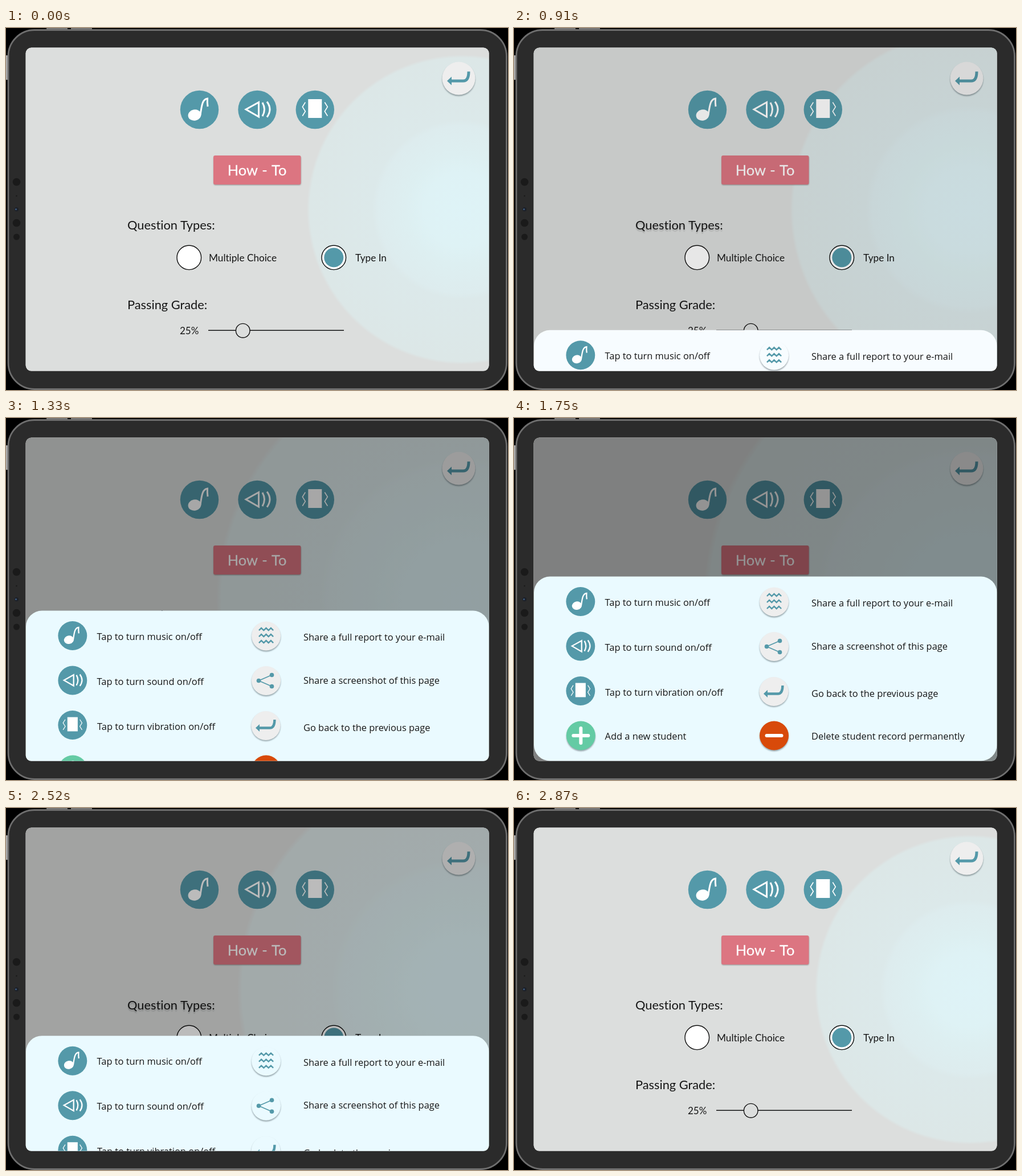
An HTML page that plays this animation: 881 by 636 pixels, repeating every 2.94 s.

```html
<!DOCTYPE html>
<html lang="en">
<head>
<meta charset="utf-8">
<title>Tablet settings sheet</title>
<style>
  html, body { margin: 0; width: 100%; height: 100%; overflow: hidden; background: #000; }
  svg { display: block; width: 881px; height: 636px; --sheet: #eafaff; --disc: #eee; }
  text { font-family: Lato, "Noto Sans", sans-serif; font-variant-ligatures: none; fill: #161616; }
  .list text { font: 16.42px "Open Sans", sans-serif; }
  .line { fill: none; stroke: #fff; stroke-width: 3; }
  .teal { fill: none; stroke: #5499a9; }
</style>
</head>
<body>
<svg id="stage" viewBox="0 0 881 636"></svg>
<script>
const LOOP = 2940, STEP = 70, TRAVEL = 324.5, TEAL = '#5499a9';
const stage = document.getElementById('stage');

const at = (x, y, body, scale = 1) => `<g transform="translate(${x} ${y}) scale(${scale})">${body}</g>`;
const dot = (x, y, r, fill, extra = '') => `<circle cx="${x}" cy="${y}" r="${r}" fill="${fill}" ${extra}/>`;
const label = (x, y, text, size, extra = '') =>
  `<text x="${x}" y="${y}" ${size ? `font-size="${size}"` : ''} ${extra}>${text}</text>`;
const path = (d, cls, extra = '') => `<path d="${d}" class="${cls}" ${extra}/>`;

// Raised round button: soft shadow below a flat disc
const raised = (r, fill, body) =>
  dot(0, 2, r, '#203038', 'opacity=".42" filter="url(#soft)"') + dot(0, 0, r, fill) + body;

const music = dot(0, 0, 33.7, TEAL) +
  '<ellipse cx="-8.5" cy="9.5" rx="11.5" ry="9.6" fill="#fff" transform="rotate(-12 -8.5 9.5)"/>' +
  path('M1.5 9C4 -7 5 -18.5 14 -19.5Q13.5 -12 14.5 -5.5', 'line');

const sound = dot(0, 0, 33.7, TEAL) +
  path('M-20 -.5L2.5 -13V12.5Z', 'line') +
  path('M9 -12.5Q16 -.5 9 11.5M17 -14Q27 -.5 17 13', 'line');

const vibrate = dot(0, 0, 33.7, TEAL) +
  '<rect x="-12" y="-18.5" width="24" height="33" fill="#fff"/>' +
  path('M-17 -13L-22 -5L-17 3L-22 11M17 -13L22 -5L17 3L22 11', 'line', 'style="stroke-width:1.6"');

const arrow = path('M-14 4.5H8Q17.5 4.5 17.5 -12', 'teal', 'stroke-width="5"') +
  `<path d="M-20.5 4.5L-12.5 -3V12Z" fill="${TEAL}"/>`;

const zigzag = [-10, 1, 12].map(y => `M-12.6 ${y}l4.2 -4 4.2 4 4.2 -4 4.2 4 4.2 -4 4.2 4`).join('');
const waves = path(zigzag, 'teal', 'stroke-width="2.4"');

const share = path('M10 -10L-13 0L10 10', 'teal', 'stroke-width="1.7"') +
  [[10, -10], [-13, 0], [10, 10]].map(([x, y]) => dot(x, y, 3.8, TEAL)).join('');

const bar = path('M-13 0H13', 'line', 'style="stroke-width:6;stroke-linecap:round"');
const plus = bar + `<g transform="rotate(90)">${bar}</g>`;

const disc = 'var(--disc)';
const device = `
  <rect x="71" y="0" width="37" height="5" fill="#777"/>
  <rect x="114" y="0" width="37" height="5" fill="#777"/>
  <rect x="0" y="48" width="3" height="43" fill="#aaa"/>
  <rect x="4" y="3.5" width="874.5" height="631" rx="46" fill="#2b2b2b" stroke="#6e6e6e" stroke-width="2.8"/>
  ${dot(18.5, 270.5, 6.8, '#1a1a1a')}${dot(18.5, 295, 1.2, '#1a1a1a')}
  ${dot(18.5, 318.5, 3.6, '#1c2029')}${dot(17.5, 318.5, 1.6, '#3d5a7c')}
  ${dot(18.5, 342.5, 6.8, '#1a1a1a')}${dot(18.5, 367, 5.5, '#1a1a1a')}`;

const settings = `
  <rect x="34" y="34" width="815" height="570" fill="#dcdedd"/>
  <rect x="34" y="34" width="815" height="570" fill="url(#glow)"/>
  ${at(794.5, 88.5, raised(29, '#eee', arrow))}
  ${at(339.5, 143.5, music)}${at(441, 143.5, sound)}${at(542.3, 143.5, vibrate)}
  <rect x="364.5" y="225.5" width="153" height="50.5" rx="3" fill="#333" opacity=".45" filter="url(#soft)"/>
  <rect x="364" y="224" width="153.5" height="51" rx="3" fill="#dc7581"/>
  ${label(440.5, 259, 'How - To', 25.4, 'text-anchor="middle" word-spacing="1.5" style="fill:#fff;stroke:#fff;stroke-width:.3"')}
  ${label(213, 354, 'Question Types:', 21.8, 'id="heading"')}
  ${dot(321.3, 403.3, 21.3, '#fff', 'stroke="#111" stroke-width="1.4"')}
  ${label(356, 409.5, 'Multiple Choice', 17.2)}
  ${dot(575.3, 403.3, 21.3, '#fff', 'stroke="#111" stroke-width="1.4"')}
  ${dot(575.3, 403.3, 17, TEAL)}
  ${label(613, 409.5, 'Type In', 17.2)}
  ${label(213, 494, 'Passing Grade:', 21.8)}
  ${label(305, 537.5, '25%', 17)}
  <path d="M355 531.3H593" stroke="#111" stroke-width="1.4"/>
  ${dot(415.7, 531.7, 12.3, '#dcdedd', 'stroke="#111" stroke-width="1.4"')}`;

const sheet = `
  <rect x="35" y="278.5" width="812.5" height="324" rx="28" fill="var(--sheet)"/>
  ${at(116.8, 322.5, music, .755)}${label(159.5, 329.5, 'Tap to turn music on/off')}
  ${at(116.8, 401, sound, .755)}${label(159.5, 408.5, 'Tap to turn sound on/off')}
  ${at(116.8, 479.5, vibrate, .755)}${label(160, 487.5, 'Tap to turn vibration on/off')}
  ${at(117.3, 558, raised(25.5, '#64cba4', plus))}${label(159.5, 564.5, 'Add a new student')}
  ${at(456.5, 323, raised(25.5, disc, waves))}${label(522, 331, 'Share a full report to your e-mail')}
  ${at(456.5, 401.5, raised(25.5, disc, share))}${label(522, 406.5, 'Share a screenshot of this page')}
  ${at(456, 480.5, raised(29, disc, arrow), .88)}${label(522, 490, 'Go back to the previous page')}
  ${at(456.5, 558, raised(25.5, '#d84a0a', bar))}${label(522, 564.5, 'Delete student record permanently')}`;

stage.innerHTML = `
  <defs>
    <filter id="soft" x="-20%" y="-20%" width="140%" height="140%"><feGaussianBlur stdDeviation="1.2"/></filter>
    <clipPath id="screen"><rect x="34.6" y="34.6" width="813" height="568" rx="10"/></clipPath>
    <radialGradient id="glow" gradientUnits="userSpaceOnUse" cx="800" cy="319" r="272">
      <stop offset="0" stop-color="#def3f7"/><stop offset=".24" stop-color="#def2f5"/>
      <stop offset=".36" stop-color="#ddeff1"/><stop offset=".54" stop-color="#ddecee"/>
      <stop offset=".58" stop-color="#dce9ea"/><stop offset=".98" stop-color="#dce7e7"/>
      <stop offset="1" stop-color="#dcdedd"/>
    </radialGradient>
  </defs>
  ${device}
  <g clip-path="url(#screen)">
    ${settings}
    <rect id="dim" x="34" y="34" width="815" height="570"/>
    <g id="sheet" class="list">${sheet}</g>
  </g>`;

const [glow, dim, panel, heading] = ['glow', 'dim', 'sheet', 'heading'].map(id => document.getElementById(id));
const ramp = (t, start, length) => Math.min(1, Math.max(0, (t - start) / length));

// Eases open, rests, then slides shut
const openness = t => t < 2100 ? 1 - (1 - ramp(t, 800, 930)) ** 2 : 1 - ramp(t, 2370, 400);

function draw(t) {
  const p = openness(t);
  const tint = t < 1200 && p < .6 ? '#f7fcff' : '#eafaff';
  panel.setAttribute('transform', `translate(0 ${(1 - p) * TRAVEL})`);
  panel.setAttribute('visibility', p > 0 ? 'visible' : 'hidden');
  dim.setAttribute('opacity', p * .425);
  glow.setAttribute('r', 272 + 195 * p);
  heading.style.textShadow = p > 0 ? '0 3px 2px rgba(0,0,0,.2)' : 'none';
  stage.style.setProperty('--sheet', tint);
  stage.style.setProperty('--disc', p < .7 ? tint : '#eee');
}

const began = performance.now();
function tick() {
  const t = (performance.now() - began) % LOOP;
  draw(Math.floor(t / STEP) * STEP);
  requestAnimationFrame(tick);
}
tick();
</script>
</body>
</html>
```
